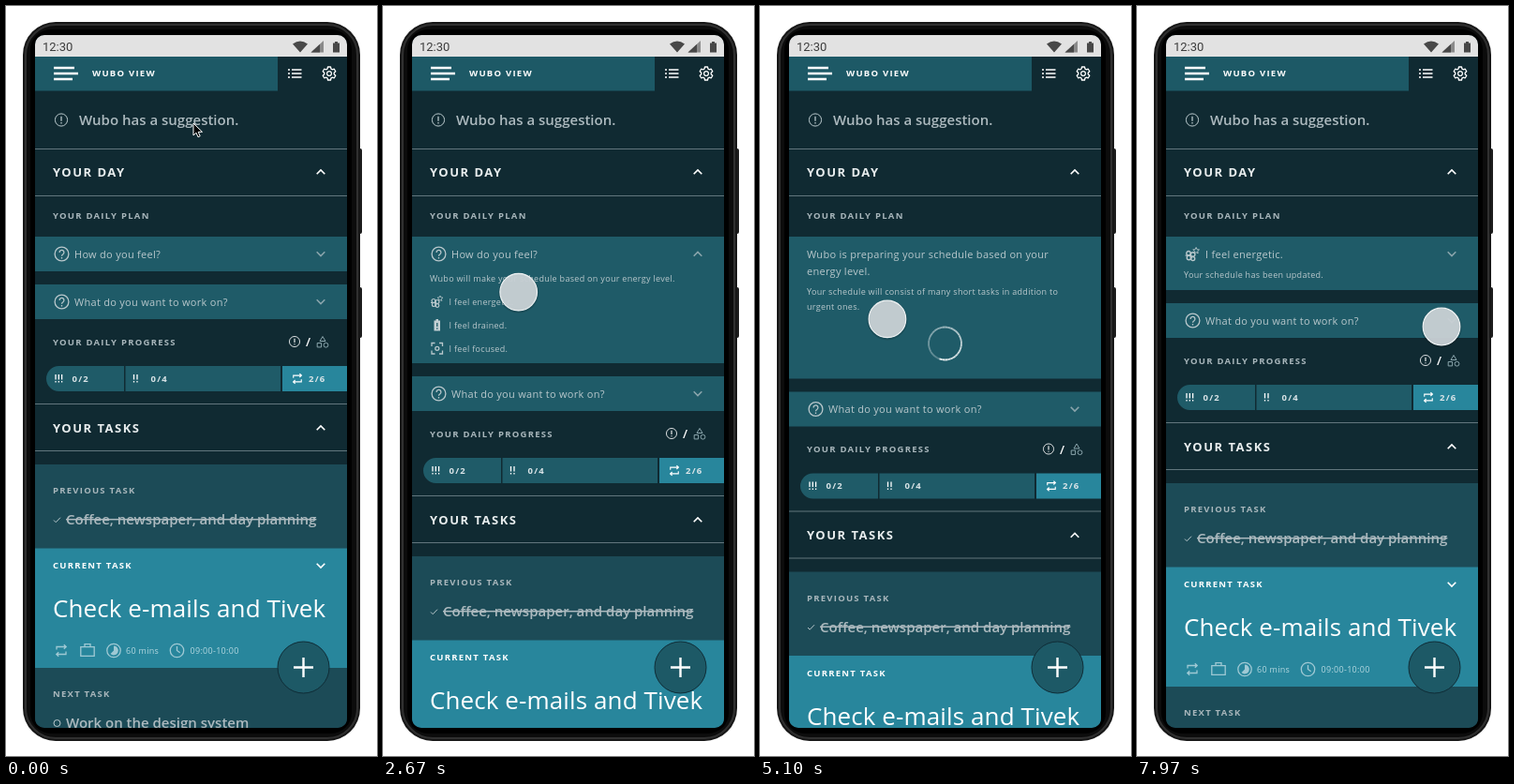
Recreate the animation shown at these times as an HTML page. Size 396x800 px, loop 8 s.

```html
<!DOCTYPE html>
<html lang="en">
<head>
<meta charset="utf-8">
<title>Daily planner</title>
<style>
  html, body { margin: 0; height: 100%; overflow: hidden; background: #fff; }
  svg { display: block; width: 396px; height: 800px; }
  text { font: 11px "Open Sans", sans-serif; letter-spacing: .28px; fill: #b9c8cc; white-space: pre; }
  .clock { font: 13px Roboto, sans-serif; letter-spacing: 0; fill: #3c3c3c; }
  .label { font-size: 9.5px; font-weight: 700; letter-spacing: 1.25px; fill: #a9b7bc; }
  .head { font-size: 13px; font-weight: 700; letter-spacing: 1.5px; fill: #e8edee; }
  .lead { font-size: 15px; font-weight: 600; letter-spacing: 0; fill: #adbabf; }
  .small { font-size: 9px; letter-spacing: .3px; }
  .task { font-size: 26px; letter-spacing: .1px; fill: #fff; }
  .slash { font-size: 13px; font-weight: 600; }
  .count { fill: #dbe5e8; }
  .info { fill: #b5d8e0; }
  .white { fill: #fff; }
  .icon { fill: none; stroke: #b9c8cc; stroke-width: 1.3; }
  .bright { stroke: #fff; }
  .pale { stroke: #9fc9d4; }
  .dim { stroke: #8aa5ac; }
  .thin { stroke-width: 1; }
  .thick { stroke-width: 1.7; }
  .heavy { stroke-width: 2.4; }
  .rule { stroke: #62767d; }
</style>
</head>
<body>
<svg viewBox="0 0 396 800">
  <defs>
    <clipPath id="screen"><rect x="31" y="31" width="333" height="739" rx="10"/></clipPath>
    <clipPath id="cardClip"><rect class="card" x="31" y="246" width="333" height="37"/></clipPath>
    <path id="up" d="M-4.3 2.2L0-2.1 4.3 2.2" stroke-width="1.6"/>
    <path id="down" d="M-4.3-2.2L0 2.1 4.3-2.2" stroke-width="1.6"/>
    <g id="alert"><circle r="6.6" stroke-width="1"/><path d="M0-3.8v5M0 2.6v1.4"/></g>
    <g id="ask"><circle r="7.4"/><path d="M-2.4-1.6A2.4 2.4 0 1 1 1.4 .3Q0 1.2 0 2.3M0 3.5v1.5"/></g>
    <path id="repeat" d="M-5-1v-3H5M2.8-6.2L5.2-4 2.8-1.8M5 1v3H-5M-2.8 1.8L-5.2 4-2.8 6.2"/>
    <g id="shapes" stroke-width="1"><path d="M0-6l3 5h-6zM-5.8 1h4.4v4.4h-4.4z"/><circle cx="3.5" cy="3.2" r="2.4"/></g>
    <path id="bag" d="M-7.2-3.4H7.2V6.4H-7.2zM-3-3.4v-3h6v3"/>
    <g id="pie"><circle r="7.2"/><path d="M0-4.9A4.9 4.9 0 1 1-3.5 3.5L0 0z" fill="#9fc9d4" stroke="none"/></g>
    <g id="time"><circle r="7.2"/><path d="M0-4.4V0l3.2 2.2"/></g>
    <g id="gear">
      <circle r="2.4"/>
      <path stroke-linejoin="round" d="M-1.5-7H1.5L2-4.9 3.2-4.2 5.3-4.8 6.8-2.2 5.2-.7V.7L6.8 2.2 5.3 4.8 3.2 4.2 2 4.9 1.5 7H-1.5L-2 4.9-3.2 4.2-5.3 4.8-6.8 2.2-5.2 .7V-.7L-6.8-2.2-5.3-4.8-3.2-4.2-2-4.9z"/>
    </g>
    <g id="energy">
      <g stroke-width="1.2"><circle cx="-3" cy="-1" r="2"/><circle cx="1" r="2"/><circle cx="-2.6" cy="3" r="2"/><circle cx="1" cy="4" r="1.8"/><path d="M-6 1h5M-1-2v7"/></g>
      <path d="M4-6.5l.9 1.9 2 .2-1.5 1.4.4 2-1.8-1-1.8 1 .4-2-1.5-1.4 2-.2z" stroke-width=".8"/>
    </g>
  </defs>

  <rect x="374" y="152" width="6" height="91" rx="2" fill="#1d1d1d"/>
  <rect x="374" y="300" width="6" height="54" rx="2" fill="#1d1d1d"/>
  <rect x="18" y="17" width="360" height="767" rx="35" fill="#171717"/>
  <rect x="21" y="20" width="354" height="761" rx="32" fill="#0c0c0c" stroke="#303030" stroke-width="2"/>
  <rect x="26" y="25" width="343" height="751" rx="22" fill="#000"/>

  <g clip-path="url(#screen)">
    <rect x="31" y="31" width="333" height="739" fill="#102a32"/>
    <rect x="31" y="31" width="333" height="23" fill="#e2e2e2"/>
    <text class="clock" x="39" y="48">12:30</text>
    <path d="M306 40.5Q314 34.5 322 40.5L314 49.5zM349 39.5h2V38h3v1.5h2v10h-7z" fill="#484848"/>
    <path d="M339 37v12.500h-13.500z" fill="#8a8a8a"/>
    <path d="M335 40.8v8.700h-9.500z" fill="#484848"/>

    <rect x="31" y="54" width="259" height="36.5" fill="#1d5966"/>
    <path d="M51 66h22M51 72h26M51 78h20" class="icon bright heavy"/>
    <text class="label white" x="92" y="75">WUBO VIEW</text>
    <path d="M301 68h2m2 0h10.500M301 72h2m2 0h10.500M301 76h2m2 0h10.500" class="icon bright thick"/>
    <use href="#gear" x="345" y="72" class="icon bright"/>

    <use href="#alert" x="59" y="121.500" class="icon"/>
    <text class="lead" x="78" y="127">Wubo has a suggestion.</text>
    <path d="M31 152.500h333M31 202.500h333" class="rule"/>
    <text class="head" x="50" y="182">YOUR DAY</text>
    <use href="#up" x="336" y="177" class="icon bright"/>
    <text class="label" x="50" y="227">YOUR DAILY PLAN</text>

    <rect class="card" x="31" y="246" width="333" height="37" fill="#1f5b68"/>
    <g clip-path="url(#cardClip)">
      <g id="question">
        <use href="#ask" x="59.5" y="264.5" class="icon"/>
        <text x="73" y="269">How do you feel?</text>
      </g>
      <use id="closedMark" href="#down" x="336" y="264.5" class="icon dim"/>
      <use id="openMark" href="#up" x="336" y="264.5" class="icon dim"/>
      <g id="choices">
        <text class="small" x="50" y="293.5">Wubo will make your schedule based on your energy level.</text>
        <use href="#energy" x="57" y="315.5" class="icon"/>
        <text class="small" x="70.5" y="318.5">I feel energetic.</text>
        <path d="M54.5 335.5h2V334H59v1.500h2v11h-6.500z" fill="#c3d0d4"/>
        <path d="M57.800 338v4m0 1.300v1.400" stroke="#1f5b68" stroke-width="1.3"/>
        <text class="small" x="70.5" y="343.5">I feel drained.</text>
        <path d="M52 363v-3.500h3.500M60 359.500h3.500v3.500M63.500 367.500v3.500H60M55.500 371H52v-3.500" class="icon"/>
        <circle cx="57.8" cy="365.3" r="2" class="icon"/>
        <text class="small" x="70.5" y="368.5">I feel focused.</text>
      </g>
      <g id="loading">
        <text x="50" y="269">Wubo is preparing your schedule based on your</text>
        <text x="50" y="287">energy level.</text>
        <g class="shift">
          <text class="small" x="50" y="307.500">Your schedule will consist of many short tasks in addition to</text>
          <text class="small" x="50" y="323.500">urgent ones.</text>
        </g>
        <g id="spinner" fill="none" stroke="#fff" stroke-width="1.8"></g>
      </g>
      <g id="done">
        <use href="#energy" transform="translate(58.5 265) scale(1.15)" class="icon"/>
        <text x="73" y="269">I feel energetic.</text>
        <text class="small shift" x="50" y="307.500">Your schedule has been updated.</text>
      </g>
    </g>

    <g id="below">
      <rect x="31" y="297" width="333" height="37" fill="#1f5b68"/>
      <use href="#ask" x="59.5" y="315.5" class="icon"/>
      <text x="73" y="319.5">What do you want to work on?</text>
      <use href="#down" x="336" y="315.5" class="icon dim"/>

      <text class="label" x="50" y="361.5">YOUR DAILY PROGRESS</text>
      <use href="#alert" transform="translate(308 358) scale(.84)" class="icon bright"/>
      <text class="slash white" x="320" y="363">/</text>
      <use href="#shapes" x="338" y="358.5" class="icon dim"/>
      <path d="M126 384H56.500a13.500 13.500 0 0 0 0 27H126zM127.500 384H293V411H127.500z" fill="#1f5b68"/>
      <rect x="295" y="384" width="69" height="27" fill="#28869c"/>
      <path d="M53 393v5.500m0 1.500v1.600M56.300 393v5.500m0 1.500v1.600M59.600 393v5.500m0 1.500v1.600M136.500 393v5.500m0 1.500v1.600M140 393v5.500m0 1.500v1.600" class="icon bright"/>
      <text class="label count" x="70.5" y="400.5">0/2</text>
      <text class="label count" x="154.5" y="400.5">0/4</text>
      <use href="#repeat" transform="translate(311 397.5) scale(.85)" class="icon bright"/>
      <text class="label count" x="323" y="400.5">2/6</text>

      <path d="M31 424.500h333M31 474.500h333" class="rule"/>
      <text class="head" x="50" y="454.5">YOUR TASKS</text>
      <use href="#up" x="336" y="450" class="icon bright"/>

      <rect x="31" y="489" width="333" height="90" fill="#1c4b57"/>
      <text class="label" x="50" y="520">PREVIOUS TASK</text>
      <path d="M51 548.500l2.200 2.200 4.800-5" class="icon thin"/>
      <text class="lead" x="64" y="553" text-decoration="line-through">Coffee, newspaper, and day planning</text>

      <rect x="31" y="578.5" width="333" height="128" fill="#28869c"/>
      <text class="label white" x="50" y="600">CURRENT TASK</text>
      <use href="#down" x="336" y="597" class="icon bright"/>
      <text class="task" x="50" y="652">Check e-mails and Tivek</text>
      <use href="#repeat" x="59" y="687.5" class="icon pale"/>
      <use href="#bag" x="87" y="687" class="icon pale"/>
      <use href="#pie" x="115" y="687.5" class="icon pale"/>
      <text class="small info" x="128" y="690.5">60 mins</text>
      <use href="#time" x="182.5" y="687.5" class="icon pale"/>
      <text class="small info" x="196.5" y="690.5">09:00-10:00</text>

      <rect x="31" y="706" width="333" height="120" fill="#1c4b57"/>
      <text class="label" x="50" y="737">NEXT TASK</text>
      <circle cx="54.5" cy="765" r="3.5" class="icon thin"/>
      <text class="lead" x="64" y="770">Work on the design system</text>
    </g>

    <circle cx="317.5" cy="705.5" r="27.5" fill="#1d5966" stroke="#0f2c36"/>
    <path d="M307 705.500h21M317.500 695v21" class="icon bright heavy"/>
  </g>

  <g id="ring" fill="none">
    <circle r="54" stroke="#d5dcde" stroke-width="3"/>
    <circle r="54" stroke="#1c1c1c" stroke-width="1.6"/>
  </g>
  <g id="touch">
    <circle cy="1" r="21.5" opacity=".15"/>
    <circle r="19.8" fill="#cbd3d7" fill-opacity=".94" stroke="#eef2f3" stroke-width="1.2"/>
  </g>
  <path id="arrow" d="M0 0v13l3-2.800 2 4.600 2.200-1-2-4.500h4.300z" stroke="#fff"/>
</svg>
<script>
const LOOP = 8000, FADE = 300;
const OPEN = 1655, LOAD = 4130, DONE = 6020;
const TAPS = [1365, 3796], TAP_TIME = 260;

// time, x, y
const touchPath = [
  [400, 420, 192], [1030, 325, 262], [2190, 325, 262], [2700, 143, 305.5], [3230, 122, 314],
  [4900, 122, 314], [5110, 136, 334], [5480, 317, 362], [6800, 317, 362], [7570, 325, 342]
];
const arrowPath = [[20, 200, 125], [210, 402, 100]];

const el = id => document.getElementById(id);
const clamp = v => Math.min(1, Math.max(0, v));
const ease = v => { v = clamp(v); return v * v * (3 - 2 * v); };
const fade = (id, v) => el(id).setAttribute("opacity", v);
const move = (node, x, y, extra = "") => node.setAttribute("transform", `translate(${x} ${y}) ${extra}`);

function along(path, t) {
  const i = Math.max(1, path.findIndex(key => key[0] > t));
  const [a, b] = t >= path.at(-1)[0] ? path.slice(-2) : [path[i - 1], path[i]];
  const k = ease((t - a[0]) / (b[0] - a[0]));
  return [a[1] + (b[1] - a[1]) * k, a[2] + (b[2] - a[2]) * k];
}

const SEGMENTS = 36, RADIUS = 17.5;
const point = i => {
  const a = i / SEGMENTS * 2 * Math.PI;
  return `${RADIUS * Math.sin(a)} ${-RADIUS * Math.cos(a)}`;
};
el("spinner").innerHTML = Array.from({ length: SEGMENTS }, (_, i) =>
  `<path d="M${point(i)}L${point(i + 1)}" opacity="${.25 + .7 * i / SEGMENTS}"/>`).join("");

function draw(t) {
  const open = ease((t - OPEN) / FADE), load = ease((t - LOAD) / FADE), done = ease((t - DONE) / FADE);
  const grow = 98 * open + 16.5 * load - 94.5 * done;
  document.querySelectorAll(".card").forEach(card => card.setAttribute("height", 37 + grow));
  document.querySelectorAll(".shift").forEach(node => move(node, 0, -18 * done));
  move(el("below"), 0, grow);
  fade("question", 1 - load);
  fade("closedMark", 1 - open + done);
  fade("openMark", open - load);
  fade("choices", open - load);
  fade("loading", load - done);
  fade("done", done);
  move(el("spinner"), 197.5, 360, `rotate(${(t - 5100) * .36 + 200})`);

  const [x, y] = along(touchPath, t);
  move(el("touch"), x, y);
  move(el("arrow"), ...along(arrowPath, t));

  const tap = TAPS.map(start => (t - start) / TAP_TIME).find(v => v >= 0 && v < 1);
  fade("ring", tap === undefined ? 0 : 1 - tap * tap);
  move(el("ring"), x, y, `scale(${1 - .62 * (tap || 0)})`);
}

function tick() {
  draw(performance.now() % LOOP);
  requestAnimationFrame(tick);
}
tick();
</script>
</body>
</html>
```
